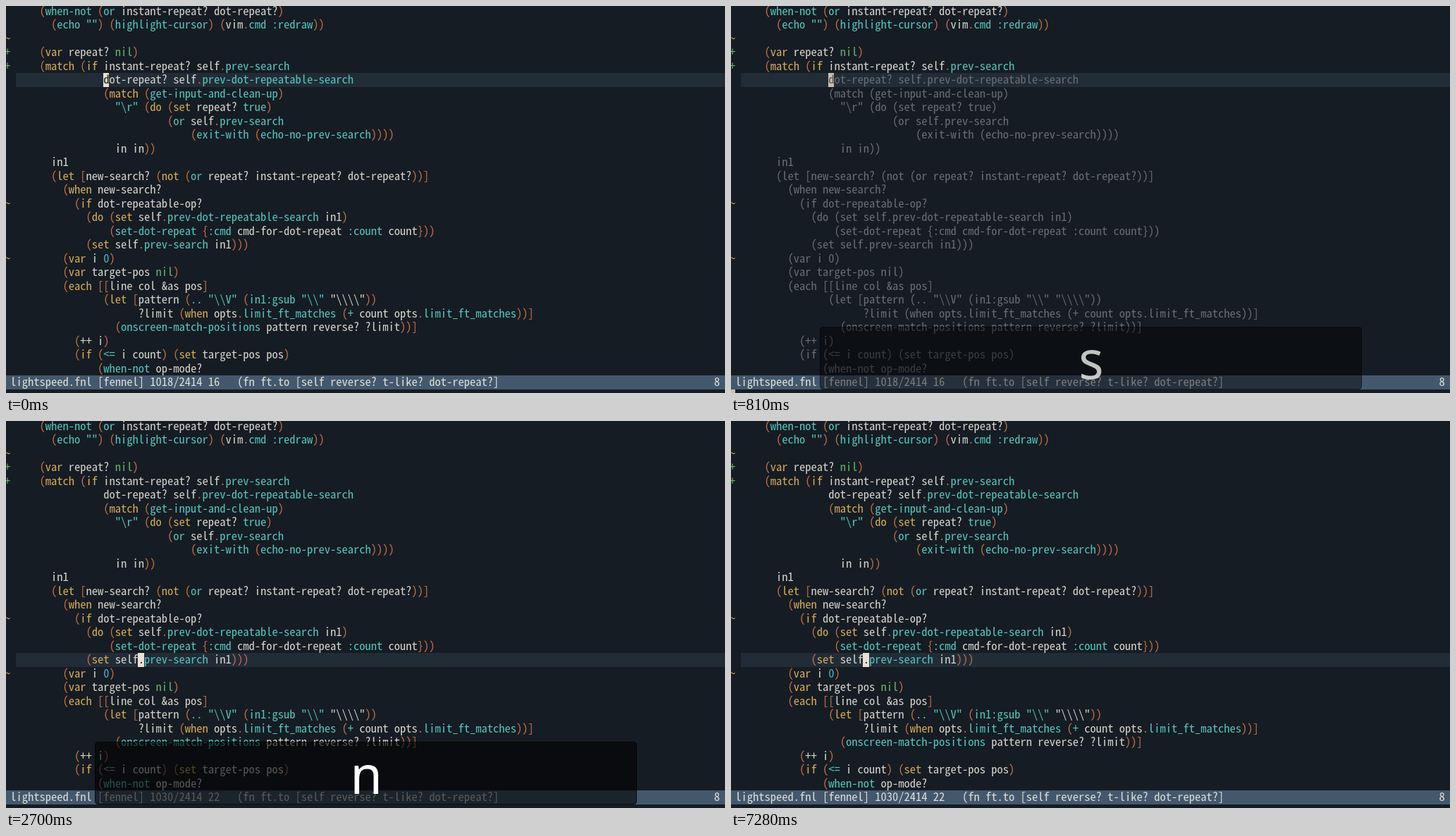
Recreate the animation shown at these times as an HTML page with a canvas. Size 1020 by 549 pixels, loop 8190 ms.

```html
<!DOCTYPE html>
<html lang="en">
<head>
<meta charset="utf-8">
<title>Jump motion in an editor</title>
<style>
  html, body { margin: 0; width: 100%; height: 100%; overflow: hidden; background: #161c23; }
  canvas { display: block; }
</style>
</head>
<body>
<canvas id="stage" width="1020" height="549"></canvas>
<script>
const LOOP = 8190;
const CELL_W = 8.25, CELL_H = 19.5, OFFSET = -2;
const MONO = '"Noto Sans Mono CJK JP", "Source Code Pro", "Noto Sans Mono", monospace';
const COLOR = {
  bg: '#161c23', line: '#222c37', bar: '#44586d', text: '#d5d5cc', barText: '#dedfd6',
  teal: '#56c5bd', yellow: '#d3ab59', paren: '#c0704b', green: '#68b070', number: '#4fb4c8',
  grey: '#696d70', cursor: '#e8e0d3', dimCursor: '#c8bfae', pink: '#f00d74', ghost: '#b59aa3'
};

const code = String.raw`    (when-not (or instant-repeat? dot-repeat?)
      (echo "") (highlight-cursor) (vim.cmd :redraw))

    (var repeat? nil)
    (match (if instant-repeat? self.prev-search
               dot-repeat? self.prev-dot-repeatable-search
               (match (get-input-and-clean-up)
                 "\r" (do (set repeat? true)
                          (or self.prev-search
                              (exit-with (echo-no-prev-search))))
                 in in))
      in1
      (let [new-search? (not (or repeat? instant-repeat? dot-repeat?))]
        (when new-search?
          (if dot-repeatable-op?
            (do (set self.prev-dot-repeatable-search in1)
                (set-dot-repeat {:cmd cmd-for-dot-repeat :count count}))
            (set self.prev-search in1)))
        (var i 0)
        (var target-pos nil)
        (each [[line col &as pos]
               (let [pattern (.. "\\V" (in1:gsub "\\" "\\\\"))
                     ?limit (when opts.limit_ft_matches (+ count opts.limit_ft_matches))]
                 (onscreen-match-positions pattern reverse? ?limit))]
          (++ i)
          (if (<= i count) (set target-pos pos)
              (when-not op-mode?`.split('\n');

const signs = { 2: '~', 3: '+', 4: '+', 14: '~', 18: '~' };
const keywords = new Set('var match if do set let not when each'.split(' '));

// Search highlights: [row, text column, text, style]
const matches = [
  [5, 31, '.p', 'plain'], [21, 30, '..', 'plain'], [22, 38, '.l', 'plain'],
  [8, 34, 'p', 'ghost'], [8, 35, 's', 'label'],
  [15, 25, 'p', 'ghost'], [15, 26, 'f', 'label'],
  [17, 21, 'p', 'ghost'], [17, 22, 'n', 'label'],
  [22, 69, 'l', 'ghost'], [22, 70, 's', 'distant']
];

const ctx = document.getElementById('stage').getContext('2d');
ctx.font = '100px ' + MONO;
const fontSize = 100 * CELL_W / ctx.measureText('0').width;

const cellX = col => OFFSET + col * CELL_W;
const cellY = row => OFFSET + row * CELL_H;

function put(text, row, col, color, bold) {
  ctx.font = (bold ? 'bold ' : '') + fontSize + 'px ' + MONO;
  ctx.textAlign = 'left';
  ctx.fillStyle = color;
  ctx.fillText(text, cellX(col), cellY(row) + 14.5);
}

function fillCells(row, col, count, color) {
  const x = Math.floor(cellX(col)), y = Math.floor(cellY(row));
  ctx.fillStyle = color;
  ctx.fillRect(x, y, Math.floor(cellX(col + count)) - x, Math.floor(cellY(row + 1)) - y);
}

function wordColor(word, isCall) {
  if (keywords.has(word)) return COLOR.yellow;
  if (word === 'nil') return COLOR.green;
  if (/^\d/.test(word)) return COLOR.number;
  if (word === '++' || word === String.raw`"\\\\"`) return COLOR.text;
  return isCall || word === 'true' || /^[:"]/.test(word) ? COLOR.teal : COLOR.text;
}

function tokenize(line) {
  const tokens = [];
  let previous = '';
  for (const found of line.matchAll(/"(?:\\.|[^"\\])*"|[()[\]{}]|[^\s()[\]{}"]+/g)) {
    const word = found[0], col = found.index + 2;
    const dotted = word.match(/^(\w+)\.(.+)$/);
    if (dotted) {
      const dot = col + dotted[1].length;
      tokens.push([dotted[1], col, COLOR.text], ['.', dot, COLOR.paren],
                  [dotted[2], dot + 1, COLOR.teal]);
    } else {
      const color = /^[()[\]{}]$/.test(word) ? COLOR.paren : wordColor(word, previous === '(');
      tokens.push([word, col, color]);
    }
    previous = word;
  }
  return tokens;
}
const tokenRows = code.map(tokenize);

function drawMatch([row, column, text, style]) {
  const col = column + 2;
  const label = style === 'label', distant = style === 'distant';
  fillCells(row, col, text.length, label ? COLOR.pink : COLOR.bg);
  const color = distant ? COLOR.pink : style === 'ghost' ? COLOR.ghost : '#fff';
  put(text, row, col, color, style !== 'ghost');
  if (label || distant) ctx.fillRect(Math.floor(cellX(col)), Math.floor(cellY(row)) + 17, 8, 1);
}

function drawEditor(t) {
  const searching = t >= 590 && t < 2600;
  const jumped = t >= 2600;
  const row = jumped ? 17 : 5, col = jumped ? 23 : 17;
  ctx.fillStyle = COLOR.bg;
  ctx.fillRect(0, 0, 1020, 549);
  fillCells(row, 2, 123, COLOR.line);

  tokenRows.forEach((tokens, r) => {
    const grey = searching && r >= 5;
    for (const [text, c, color] of tokens) put(text, r, c, grey ? COLOR.grey : color);
    const sign = signs[r];
    if (sign) put(sign, r, 0, sign === '+' ? COLOR.green : COLOR.yellow);
  });
  if (searching && t >= 1600) matches.forEach(drawMatch);

  fillCells(row, col, 1, searching ? COLOR.dimCursor : COLOR.cursor);
  put(code[row][col - 2], row, col, searching ? '#55534f' : COLOR.bg);

  fillCells(27, 0, 125, COLOR.bar);
  const place = jumped ? '1030/2414 22' : '1018/2414 16';
  put(`lightspeed.fnl [fennel] ${place}   (fn ft.to [self reverse? t-like? dot-repeat?]`,
      27, 1, COLOR.barText);
  put('8', 27, 122, COLOR.barText);
  if (searching) fillCells(28, 0, 1, COLOR.dimCursor);
}

function panelAlpha(t) {
  if (t < 590) return 0;
  if (t < 6260) return Math.min(1, (Math.floor((t - 585) / 103) + 1) / 4);
  return Math.max(0, 1 - (Math.floor((t - 6250) / 102) + 0.5) / 10.5);
}

// Overlay that shows the last key pressed
function drawKey(t) {
  ctx.globalAlpha = panelAlpha(t);
  ctx.beginPath();
  ctx.roundRect(126.5, 455.5, 768, 88, 4);
  ctx.fillStyle = 'rgba(0,0,0,0.6)';
  ctx.fill();
  ctx.strokeStyle = 'rgba(0,0,0,0.75)';
  ctx.lineWidth = 1;
  ctx.stroke();
  ctx.font = 'semi-condensed 74px "Noto Sans", "Open Sans", sans-serif';
  ctx.textAlign = 'center';
  ctx.fillStyle = '#fff';
  ctx.fillText(t < 1600 ? 's' : t < 2600 ? '.' : 'n', 511, 529);
  ctx.globalAlpha = 1;
}

const start = performance.now();
function frame() {
  const t = (performance.now() - start) % LOOP;
  drawEditor(t);
  drawKey(t);
  requestAnimationFrame(frame);
}
frame();
</script>
</body>
</html>
```
